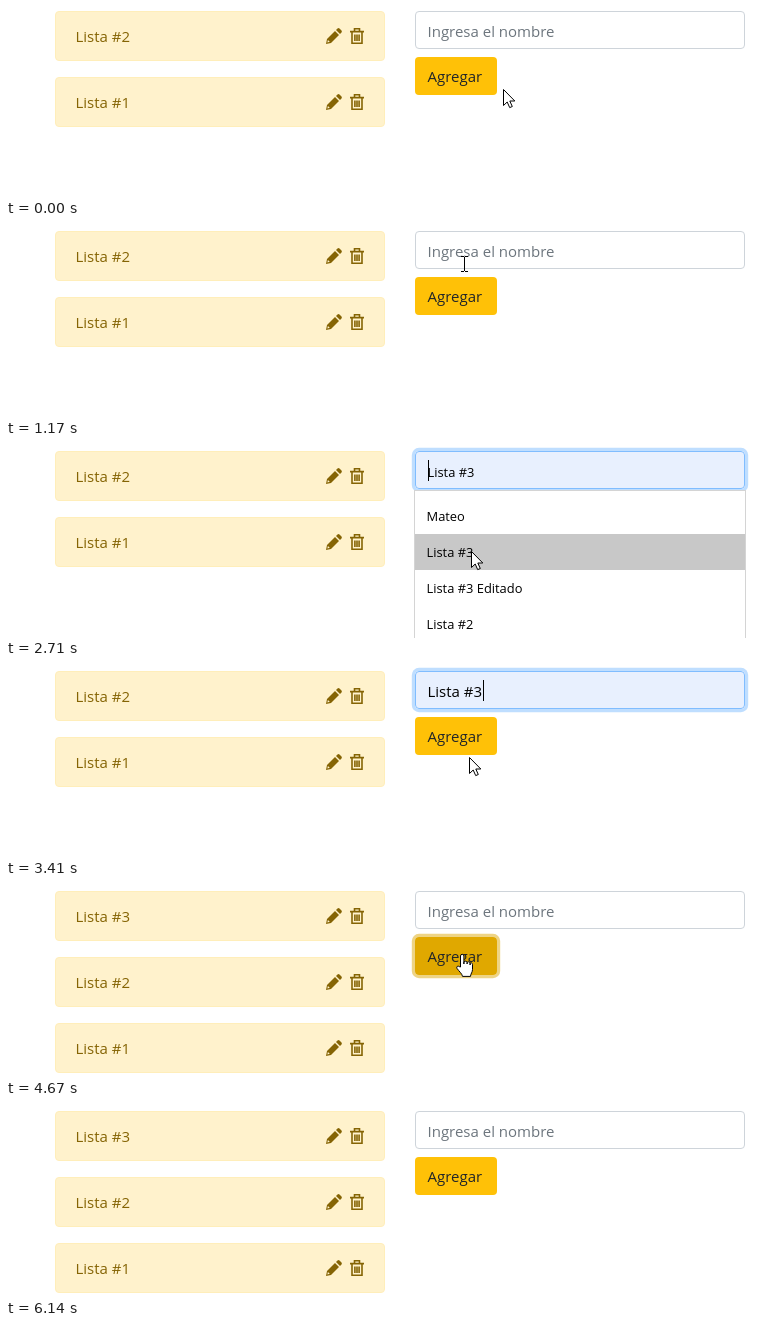
Recreate the animation shown at these times as an HTML page. Size 754x192 px, loop 6210 ms.

```html
<!DOCTYPE html>
<html lang="es">
<head>
<meta charset="utf-8">
<style>
  html, body { margin: 0; height: 100%; overflow: hidden; background: #fff; }
  svg { display: block; font: 15px "Open Sans", "Noto Sans", sans-serif; }
  .small { font-size: 12.9px; }
</style>
</head>
<body>
<svg width="754" height="192" viewBox="0 0 754 192">
  <defs>
    <g id="card">
      <rect x="49.5" y="5.5" width="329" height="49" rx="3.5" fill="#fff2cc" stroke="#ffeeba"/>
      <path transform="translate(320 22)" fill="#856404"
        d="M0 16l1-5 8-8 4 4-8 8zM10 2l1.5-1.5q1-.8 2 0l2 2q.8 1 0 2L14 6zM1.9 12l-.5 2.4 2.4-.6z" fill-rule="evenodd"/>
      <path transform="translate(344 22)" fill="none" stroke="#856404" stroke-width="1.6"
        d="M0 3.6h14M4.5 3V.8h5V3M2 4v11.2h10V4M4.9 6.5v6.5M7 6.5v6.5M9.1 6.5v6.5"/>
    </g>
  </defs>
  <g id="list" fill="#856404"></g>

  <rect id="fieldRing" x="407.4" y="3.4" width="333.2" height="41.2" rx="5.6" fill="none" stroke="#bfdeff" stroke-width="3.2"/>
  <rect id="field" x="409.5" y="5.5" width="329" height="37" rx="3.5"/>
  <text id="fieldText" x="421.5" y="31"></text>
  <path id="caret" d="M0 14v21" stroke="#000"/>

  <rect id="buttonRing" x="407.4" y="49.4" width="85.2" height="41.2" rx="5.6" fill="none" stroke="#eed485" stroke-width="3.2"/>
  <rect id="button" x="409" y="51" width="82" height="38" rx="4"/>
  <text x="421.5" y="76" fill="#212529">Agregar</text>

  <g id="menu" class="small">
    <rect x="408.5" y="44.5" width="331" height="160" fill="#fff" stroke="#d4d4d4"/>
    <rect id="highlight" x="409" width="330" height="36" fill="#c8c8c8"/>
  </g>

  <g id="cursor" stroke-linejoin="round">
    <path id="arrow" fill="#fff" stroke="#000" d="M.5.5v16l3.7-3.5 2.5 5.6 2.6-1.1-2.5-5.5h5z"/>
    <path id="beam" fill="none" stroke="#000" d="M-3-7.5h3m1 0h3M.5-7v14M-3 7.5h3m1 0h3"/>
    <path id="hand" fill="#fff" stroke="#000"
      d="M-1.5 13V2a1.7 1.7 0 0 1 3.4 0v8V8c.3-1.2 3-1.2 3.2.4V10 8.4c.5-1 2.8-.8 3 .8V11 9.2c.6-.8 2.4-.4 2.4 1.2v5c0 3-1.8 4-2 7H.5c-.5-3-3.5-5-5.5-8-1-1.8 1-3 2.2-1.8z"/>
  </g>
</svg>
<script>
const LOOP = 6210;
const OPTIONS = ['Mateo', 'Lista #3', 'Lista #3 Editado', 'Lista #2'];
const START = [497, 83];
// Cursor moves: first step, last step, step count, destination x, y
const MOVES = [
  [70, 610, 8, 466, 76], [760, 760, 1, 462, 74],
  [1030, 1030, 1, 460, 50], [1100, 1170, 2, 458, 38], [1250, 1320, 2, 459, 25],
  [1780, 1780, 1, 458, 25], [1950, 2020, 2, 462, 33],
  [2250, 2410, 3, 462, 51], [2490, 2710, 4, 465, 105], [2790, 2790, 1, 466, 110],
  [3330, 3640, 5, 459, 63],
  [4670, 4670, 1, 456, 68], [4746, 5280, 8, 556, 155], [5360, 5590, 4, 609, 196],
];

const $ = id => document.getElementById(id);
const show = (id, on) => $(id).setAttribute('visibility', on ? 'visible' : 'hidden');
const set = (id, attrs) => { for (const k in attrs) $(id).setAttribute(k, attrs[k]); };
const within = (t, a, b) => t >= a && t < b;
const ramp = (t, start) => Math.min(1, Math.max(0, (t - start) / 150));
const mix = (a, b, k) => `rgb(${a.map((v, i) => Math.round(v + (b[i] - v) * k))})`;

$('list').innerHTML = [0, 1, 2].map(i =>
  `<g id="item${i}" transform="translate(0 ${66 * i})"><use href="#card"/><text id="label${i}" x="69.5" y="36"></text></g>`).join('');
$('menu').innerHTML += OPTIONS.map((name, i) => `<text x="420.5" y="${75 + 36 * i}">${name}</text>`).join('');

function cursorAt(t) {
  let [x, y] = START;
  for (const [from, to, steps, endX, endY] of MOVES) {
    if (t < from) break;
    const step = Math.floor((t - from) * (steps - 1) / (to - from || 1)) + 1;
    const k = Math.min(1, step / steps);
    x += (endX - x) * k;
    y += (endY - y) * k;
  }
  return [Math.round(x), Math.round(y)];
}

function drawCursor(x, y) {
  const inColumn = x >= 409 && x < 739;
  const overField = inColumn && within(y, 5, 43);
  const overButton = x >= 409 && x < 491 && within(y, 51, 89) && !menuOpen;
  set('cursor', { transform: `translate(${x} ${y})` });
  show('beam', overField);
  show('hand', overButton);
  show('arrow', !overField && !overButton);
}

let menuOpen = false;

function draw(t) {
  const [x, y] = cursorAt(t);
  menuOpen = within(t, 1470, 3020);
  const row = menuOpen && y >= 52 ? Math.floor((y - 52) / 36) : -1;
  const chosen = within(t, 3020, 4040);
  const filled = chosen || row >= 0;
  const focus = t < 3890 ? ramp(t, 1360) : 0;

  const count = t < 4110 ? 2 : 3;
  for (let i = 0; i < 3; i++) {
    show('item' + i, i < count);
    $('label' + i).textContent = `Lista #${count - i}`;
  }

  set('fieldRing', { opacity: focus });
  set('field', {
    fill: filled ? '#e8f0fe' : '#fff',
    stroke: mix([206, 212, 218], [128, 189, 255], focus),
  });
  $('fieldText').textContent = chosen ? OPTIONS[1] : filled ? OPTIONS[row] : 'Ingresa el nombre';
  set('fieldText', { fill: filled ? '#000' : '#6c757d', class: row >= 0 ? 'small' : '' });
  set('caret', { transform: `translate(${chosen ? 477.5 : 422.5} 0)` });
  show('caret', within(t, 1400, 1950) || within(t, 2490, 3550));

  const hover = t < 6140 ? ramp(t, 220) - ramp(t, 1010) + ramp(t, 3480) : 0;
  set('button', { fill: mix([255, 193, 7], [224, 168, 0], hover) });
  show('buttonRing', within(t, 3890, 6140));

  show('menu', menuOpen);
  show('highlight', row >= 0);
  set('highlight', { y: 52 + 36 * row });
  drawCursor(x, y);
}

const began = performance.now();
function tick() {
  draw((performance.now() - began) % LOOP);
  requestAnimationFrame(tick);
}
tick();
</script>
</body>
</html>
```
